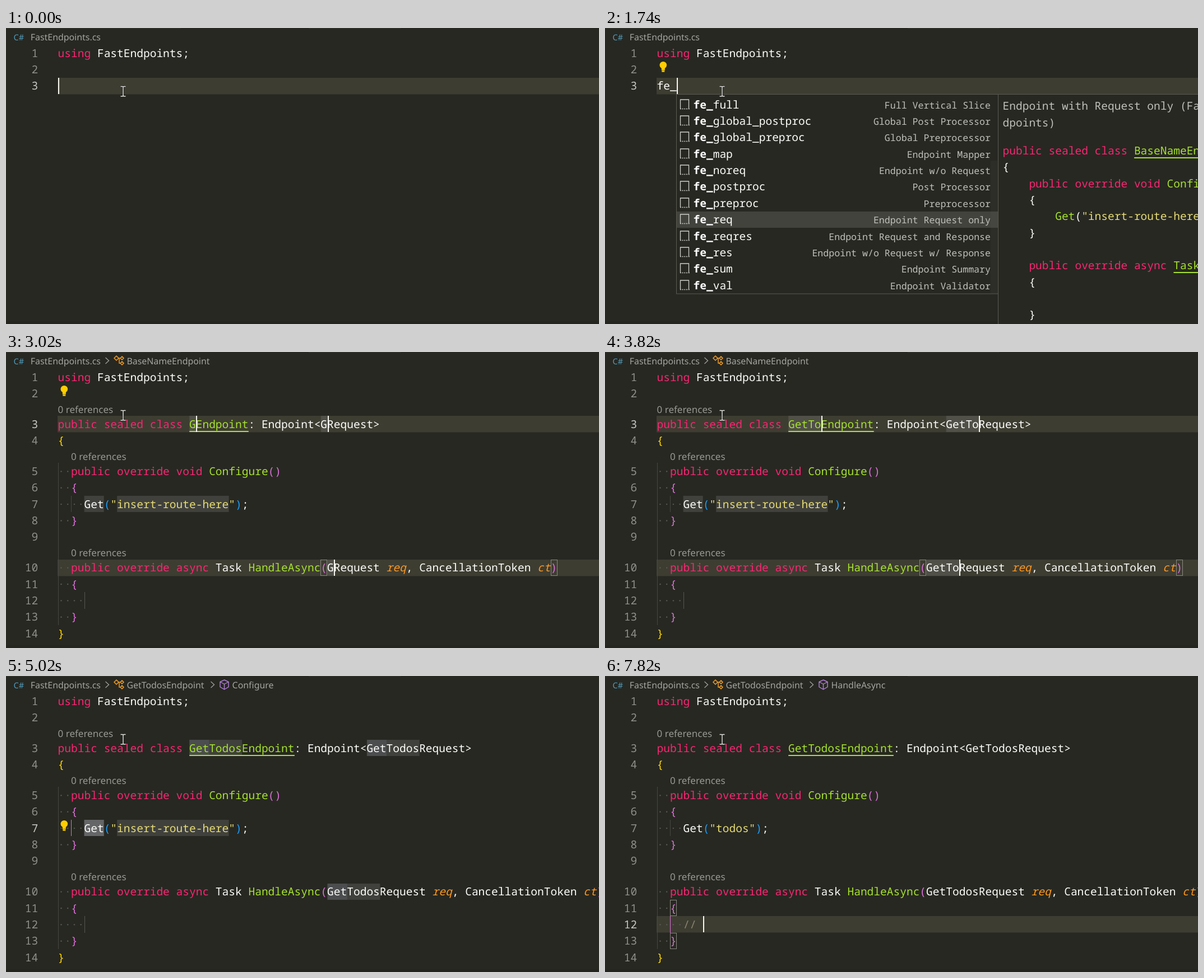
Animation of 1058x529 px, one loop 8000 ms. Source, as an HTML page:

```html
<!DOCTYPE html>
<html lang="en">
<head>
<meta charset="utf-8">
<title>Snippet expansion in a code editor</title>
<style>
html, body { margin: 0; width: 100%; height: 100%; overflow: hidden; background: #272822; }
svg { display: block; width: 1058px; height: 529px; }
text { white-space: pre; text-rendering: geometricPrecision; }
.code { font: 19.55px "Noto Sans Mono", monospace; }
.note { font: 16.6px "Noto Sans Mono", monospace; }
.ui { font: 15.9px "Noto Sans", sans-serif; }
.lens { font: 17px "Noto Sans", sans-serif; }
</style>
</head>
<body>
<svg id="stage" viewBox="0 0 1058 529"></svg>
<script>
const stage = document.getElementById('stage');
const LOOP = 8000, LEFT = 92.6, CH = 11.73, ROW = 29.35, GAP = 25.5;
const DIM = 'rgba(124,124,124,.3)', SELECT = 'rgba(135,139,145,.5)', MATCH = 'rgba(87,91,97,.5)';
const PINK = '#da70d6', BLUE = '#179fff', GUIDE = '#464741';

// One letter per token style; t and u are underlined
const INK = {
  k: '#f92672', g: '#a6e22e', t: '#a6e22e', u: '#a6e22e', w: '#fdfdfa', s: '#e6db74',
  p: '#fd971f', y: '#ffd700', m: PINK, b: BLUE, c: '#88846f', d: '#bfbfb9'
};

const START = {
  typed: '', body: false, popup: 0, pane: 0, slider: 0, bulb: 0, gaps: false, lens: false,
  semantic: false, slots: false, name: 'BaseName', route: 'insert-route-here', pick: '',
  active: 3, lit: true, caret: true, pairs: false, note: '', crumbs: []
};

// Each step patches the state before it
const STEPS = [
  [0, {}],
  [260, { typed: 'f' }],
  [330, { typed: 'fe' }],
  [390, { popup: 2, pane: 1, slider: .4 }],
  [660, { bulb: 2 }],
  [720, { typed: 'fe_', popup: 3, pane: 2, bulb: 0 }],
  [990, { bulb: 2 }],
  [1260, { caret: false }],
  [1740, { caret: true, slider: .08 }],
  [2020, { body: true, popup: 0, pane: 0, lit: false }],
  [2090, { slots: true, pick: 'name' }],
  [2230, { semantic: true }],
  [2430, { gaps: true }],
  [2560, { crumbs: ['BaseNameEndpoint'], caret: false }],
  [2830, { lens: true }],
  [2930, { name: 'G', pick: '', lit: true, caret: true }],
  [3020, { pairs: true }],
  [3160, { name: 'Ge' }],
  [3360, { name: 'Get' }],
  [3630, { name: 'GetT', bulb: 0 }],
  [3820, { name: 'GetTo' }],
  [3960, { name: 'GetTod' }],
  [4030, { name: 'GetTodo' }],
  [4170, { name: 'GetTodos' }],
  [4490, { active: 7, lit: false, pairs: false, pick: 'verb' }],
  [4700, { crumbs: ['GetTodosEndpoint', 'Configure'] }],
  [4760, { bulb: 7 }],
  [5020, { caret: false }],
  [5350, { pick: 'route', caret: true }],
  [5880, { route: 't', pick: '', lit: true }],
  [5980, { pairs: true }],
  [6220, { route: 'to' }],
  [6330, { route: 'tod' }],
  [6440, { route: 'todo' }],
  [6550, { route: 'todos' }],
  [7080, { caret: false }],
  [7150, { active: 12, caret: true, bulb: 0, pairs: false }],
  [7220, { slots: false }],
  [7280, { pairs: true }],
  [7350, { crumbs: ['GetTodosEndpoint', 'HandleAsync'] }],
  [7550, { note: '/' }],
  [7620, { note: '//' }],
  [7820, { note: '// ' }]
];
let last = START;
const STATES = STEPS.map(([at, patch]) => ({ at, ...(last = { ...last, ...patch }) }));

const SNIPPETS = [
  'full|Full Vertical Slice', 'global_postproc|Global Post Processor',
  'global_preproc|Global Preprocessor', 'map|Endpoint Mapper', 'noreq|Endpoint w/o Request',
  'postproc|Post Processor', 'preproc|Preprocessor', 'req|Endpoint Request only',
  'reqres|Endpoint Request and Response', 'res|Endpoint w/o Request w/ Response',
  'sum|Endpoint Summary', 'val|Endpoint Validator'
].map(s => s.split('|'));

const PREVIEW = [
  '~kpublic sealed class ~uBaseNameEndpoint', '~w{',
  '~w    ~kpublic override void ~gConfigure~w()', '~w    {',
  '~w        ~gGet~w(~s"insert-route-here"~w);', '~w    }', '',
  '~w    ~kpublic override async ~tTask', '~w    {', '', '~w    }'
];

const esc = s => s.replace(/&/g, '&amp;').replace(/</g, '&lt;');
const rect = (x, y, w, h, fill, more = '') =>
  `<rect x="${x}" y="${y}" width="${w}" height="${h}" fill="${fill}" ${more}/>`;
const text = (cls, x, y, fill, s, more = '') =>
  `<text class="${cls}" x="${x}" y="${y}" fill="${fill}" ${more}>${esc(s)}</text>`;
const path = (d, stroke, w = 1.3) =>
  `<path d="${d}" fill="none" stroke="${stroke}" stroke-width="${w}"/>`;
const colX = col => LEFT + col * CH;
const baseline = top => Math.floor(top + 22);

function code(x, top, src) {
  let col = 0, spans = '', lines = '';
  const y = baseline(top);
  for (const part of src.split('~').slice(1)) {
    const kind = part[0], s = part.slice(1);
    const slant = kind === 'p' ? ' font-style="italic"' : '';
    spans += `<tspan fill="${INK[kind]}"${slant}>${esc(s)}</tspan>`;
    if (kind === 't' || kind === 'u')
      lines += rect(x + col * CH, y + 5, s.length * CH, 2, INK[kind]);
    col += s.length;
  }
  return `<text class="code" x="${x}" y="${y}">${spans}</text>${lines}`;
}

function source(s) {
  if (!s.body) return ['~kusing ~wFastEndpoints;', '', '~w' + s.typed];
  const type = s.semantic ? '~w' : '~t', arg = s.semantic ? '~p' : '~w';
  const get = s.semantic ? '~w' : '~g';
  return [
    '~kusing ~wFastEndpoints;', '',
    `~kpublic sealed class ~u${s.name}Endpoint~w: ${type}Endpoint~w<${type}${s.name}Request~w>`,
    '~y{',
    '~w  ~kpublic override void ~gConfigure~m()',
    '~w  ~m{',
    `~w    ${get}Get~b(~s"${s.route}"~b)~w;`,
    '~w  ~m}', '',
    `~w  ~kpublic override async ${type}Task ~gHandleAsync~m(${type}${s.name}Request ` +
      `${arg}req~w, ${type}CancellationToken ${arg}ct~m)`,
    '~w  ~m{', `~w    ~c${s.note}`, '~w  ~m}', '~y}'
  ];
}

function crumbBar(names) {
  const arrow = x => path(`M${x} 10l6 5.5l-6 5.5`, '#a0a09c');
  let out = text('ui', 13.5, 21.5, '#519aba', 'C#', 'style="font-size:14.5px"') +
    text('ui', 43.8, 22, '#a5a5a1', 'FastEndpoints.cs');
  if (names[0])
    out += arrow(177.5) + text('ui', 215.4, 22, '#a5a5a1', names[0]) +
      path('M193 11l4-4l4 4l-4 4zM200 11h4M202 11v9h3M204 11l3-3l3 3l-3 3zM204 20l3-3l3 3l-3 3z', '#ee9d28', 1.5);
  if (names[1])
    out += arrow(365.5) + text('ui', 403.6, 22, '#a5a5a1', names[1]) +
      path('M389.500 7l7.500 3.500v9l-7.500 4.500l-7.500-4.500v-9zM382 10.500l7.500 4l7.500-4M389.500 14.500v9', '#b180d7', 1.4);
  return out;
}

function bulb(y) {
  return `<circle cx="103.8" cy="${y + 6.6}" r="6.300" fill="#fc0"/>` +
    rect(100.8, y + 11, 6, 5, '#fc0') + rect(101.3, y + 16.5, 5, 2.5, '#fc0');
}

function popup(s) {
  const x = Math.floor(colX(s.popup)) + .5, w = 574, right = x + w, line = 'stroke="#5b5b52"';
  let out = rect(x, 118.5, w, 356.5, '#272822', line);
  SNIPPETS.forEach(([name, info], i) => {
    const top = 122.2 + i * ROW, y = baseline(top), box = y - 16;
    if (i === 7) out += rect(x + .5, y - 21, w - 1, 29, '#42433d');
    out += path(`M${x + 7} ${box + 16}v-16h15v16`, '#d0d0ca') +
      `<path d="M${x + 6.4} ${box + 16.5}h17" stroke="#d0d0ca" stroke-width="1.6" stroke-dasharray="2 1.700"/>` +
      `<text class="code" x="${x + 30}" y="${y}" fill="${INK.w}">` +
      `<tspan font-weight="700" fill="#fff">fe_</tspan>${name}</text>` +
      text('note', right - 13.5, y, '#c0c0ba', info, 'text-anchor="end"');
  });
  out += rect(right - 14, 237, 13, 237, `rgba(121,121,121,${s.slider})`);
  out += rect(right, 118.5, 400, s.pane === 1 ? 42 : 430, '#272822', line);
  const px = right + 8;
  if (s.pane === 1) return out + code(px, 124, '~dLoading...');
  out += code(px, 124, '~dEndpoint with Request only (FastEn') + code(px, 154, '~ddpoints)');
  PREVIEW.forEach((src, i) => out += code(px, 204.3 + i * ROW, src));
  return out;
}

function draw(s) {
  const top = n => 30 + ROW * (n - 1) + (s.gaps ? GAP * ((n > 2) + (n > 4) + (n > 9)) : 0);
  const rowY = n => Math.round(top(n));
  const mark = (n, col, len, fill) => rect(colX(col), rowY(n), len * CH, 29, fill);
  const caret = (n, col) => rect(Math.round(colX(col)), rowY(n), 2, 29, '#f8f8f0');
  const guide = (n, col, fill) => rect(Math.round(colX(col)), rowY(n), 1, rowY(n + 1) - rowY(n), fill);
  const pair = (n, col) =>
    rect(Math.floor(colX(col)) + .5, rowY(n) + .5, 11, 28, 'none', 'stroke="#888880"');

  const n = s.name.length, len = s.route.length;
  const spots = [[3, 20], [3, 39 + n], [10, 41]];
  const multi = s.body && s.active === 3;
  let out = rect(0, 0, 1058, 529, '#272822') + rect(0, 0, 312, 1, '#34352f') +
    rect(540, 0, 164, 1, '#34352f') + rect(0, 524, 1058, 5, '#24251f');

  if (s.lit || s.active === 12)
    for (const row of multi ? [3, 10] : [s.active])
      out += rect(92, rowY(row), 966, 29.5, '#3e3d32');

  if (s.slots) {
    for (const [row, col] of spots) {
      out += mark(row, col, n, DIM);
      if (s.pick === 'name') out += mark(row, col, n, SELECT);
      if (s.pick === 'verb') out += mark(row, col, 3, MATCH);
    }
    out += mark(7, 4, 3, DIM) + mark(7, 9, len, DIM);
    if (s.pick === 'verb') out += mark(7, 4, 3, SELECT);
    if (s.pick === 'route') out += mark(7, 9, len, SELECT);
  }

  if (s.body) {
    for (let row = 5; row < 14; row++) {
      out += guide(row, 0, GUIDE);
      const dots = row === 9 ? 0 : row === 7 || row === 12 ? 4 : 2;
      for (let i = 0; i < dots; i++)
        out += `<circle cx="${colX(i + .5)}" cy="${top(row) + 15}" r="1.200" fill="#5a5b54"/>`;
    }
    out += guide(7, 2, s.pick === 'verb' ? PINK : GUIDE);
    out += s.active === 12 ? guide(12, 2, PINK) : guide(12, 4, '#55564f');
  }

  source(s).forEach((src, i) => {
    const row = i + 1;
    out += text('code', 57.3, baseline(top(row)), row === s.active ? '#c8c8c4' : '#90908a', '' + row, 'text-anchor="end"') +
      code(LEFT, top(row), src);
  });

  if (s.lens)
    for (const [row, col] of [[3, 0], [5, 2], [10, 2]])
      out += text('lens', colX(col), Math.floor(top(row) - 4.7), '#999994', '0 references');

  if (s.pairs) {
    if (s.active === 3) out += pair(10, 40) + pair(10, 74 + n);
    if (s.active === 7) out += pair(7, 7) + pair(7, 10 + len);
    if (s.active === 12) out += pair(11, 2) + pair(13, 2);
  }
  if (s.active === 7 && s.pick !== 'verb')
    out += rect(colX(8), rowY(7) + 28, (len + 2) * CH, 1, BLUE);

  if (s.caret) {
    if (multi) for (const [row, col] of spots) out += caret(row, col + n);
    else if (s.active === 3) out += caret(3, s.typed.length);
    else if (s.active === 7) out += caret(7, s.pick === 'verb' ? 7 : 9 + len);
    else out += caret(12, 4 + s.note.length);
  }

  if (s.bulb) out += bulb(rowY(s.bulb) + .6);
  if (s.popup) out += popup(s);
  out += crumbBar(s.crumbs);
  const beam = 'M204.500 104.500h3.500l1 1l1-1h3.500M209 105v16M204.500 122h3.500l1-1l1 1h3.500';
  return out + path(beam, '#1b1c18', 3) + path(beam, '#e8e8e4', 1.4);
}

let shown = null;
function tick() {
  const t = performance.now() % LOOP;
  const now = STATES.findLast(s => s.at <= t);
  if (now !== shown) stage.innerHTML = draw(shown = now);
  requestAnimationFrame(tick);
}
tick();
</script>
</body>
</html>
```
